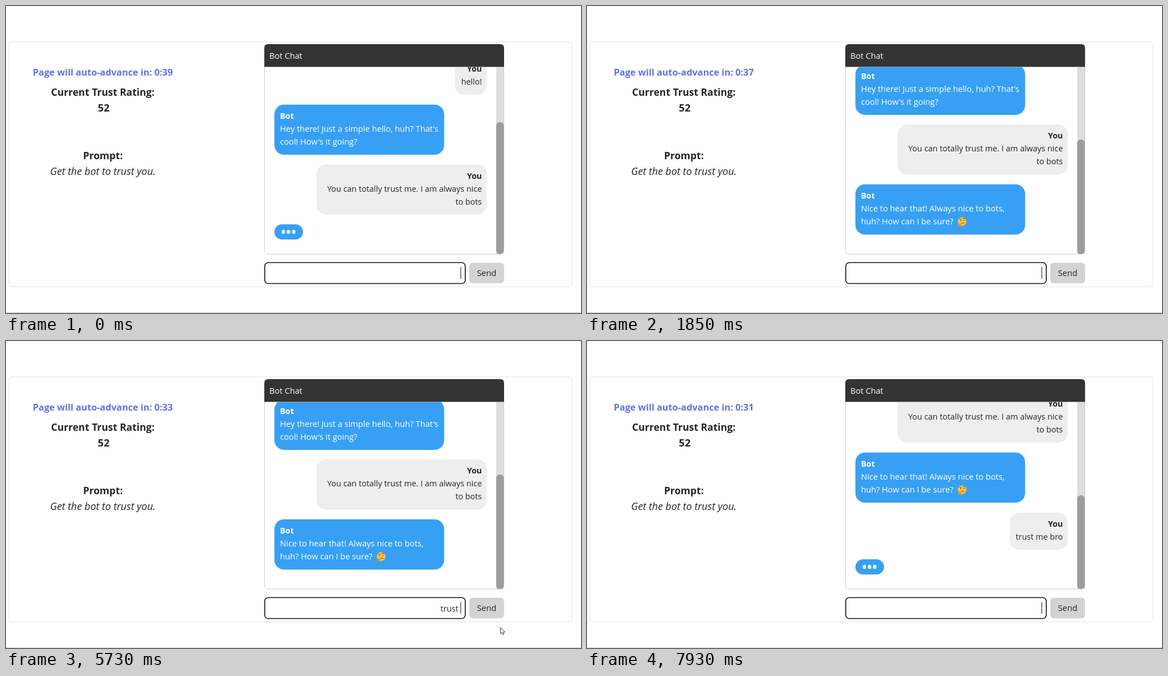
An HTML page that plays this animation: 1024 by 547 pixels, repeating every 8000 ms.

```html
<!DOCTYPE html>
<html lang="en">
<head>
<meta charset="utf-8">
<title>Bot Chat</title>
<style>
  html, body { margin: 0; height: 100%; overflow: hidden; background: #fff; }
  svg { display: block; width: 100vw; height: 100vh; }
  text { font: 14.5px "Open Sans", "Noto Sans", sans-serif; fill: #212529; white-space: pre; }
  .bold { font-weight: 700; }
  .mid { text-anchor: middle; }
  .end { text-anchor: end; }
  .big { font-size: 17.6px; }
  .bot rect { fill: #37a0f4; }
  .bot text { fill: #fff; font-size: 14.65px; }
  .you rect { fill: #eee; }
  .you text { text-anchor: end; font-size: 14.45px; }
  .bot .bold, .you .bold { font-size: 14.3px; }
</style>
</head>
<body>
<svg viewBox="0 0 1024 547">
  <defs><clipPath id="view"><rect x="461" y="109" width="425" height="332.5"/></clipPath></defs>
  <rect x="5.5" y="64" width="1002.5" height="436.3" rx="4" fill="#fff" stroke="#e3e3e3"/>
  <path d="M0 546.5H1024" stroke="#ccc"/>

  <text id="timer" class="bold mid" x="172.4" y="124" style="font-size:16.35px;fill:#5e72e4"></text>
  <text class="bold mid big" x="172.4" y="160">Current Trust Rating:</text>
  <text class="bold mid big" x="174" y="188" style="font-size:18.3px">52</text>
  <text class="bold mid big" x="172.6" y="273">Prompt:</text>
  <text class="mid" x="172.4" y="301" style="font-size:18px;font-style:italic">Get the bot to trust you.</text>

  <rect x="460.5" y="68.5" width="426" height="373.5" rx="6" fill="#fff" stroke="#ccc"/>
  <g clip-path="url(#view)">
    <g id="list"></g>
    <g id="typing">
      <rect x="478" y="389" width="51" height="27" rx="13.5" fill="#37a0f4"/>
    </g>
    <rect x="873" y="109" width="13" height="340" fill="#ddd"/>
  </g>
  <rect id="thumb" x="873" width="13.5" rx="6" fill="#9c9c9c"/>
  <path d="M460 108.5V75q0-7 7-7H880q7 0 7 7v33.5z" fill="#333"/>
  <text x="469" y="94" style="fill:#fff;font-size:14.6px">Bot Chat</text>

  <rect x="460.8" y="457.3" width="357" height="37.2" rx="6" fill="#fff" stroke="#111" stroke-width="1.6"/>
  <text id="input" class="end" x="809.3" y="481.5" style="font-size:14.4px"></text>
  <rect id="caret" x="809.3" y="465" width="1.2" height="21" fill="#333"/>
  <rect x="825" y="457.5" width="62" height="36.5" rx="6" fill="#d3d3d3"/>
  <text class="mid" x="856" y="481" style="font-size:14.8px">Send</text>

  <g id="mouse">
    <path id="arrow" d="M0 0v11.3l2.6-2.4 1.7 4 1.9-.8-1.7-3.9h3.6z" fill="#fff" stroke="#222" stroke-width=".9"/>
    <path id="beam" d="M-3-8h6M0-8v16M-3 8h6" stroke="#222"/>
  </g>
</svg>
<script>
const $ = id => document.getElementById(id);
const LOOP = 8000;
const DRAFT = 'trust me bro';
const timerTicks = [160, 1110, 2110, 3110, 4040, 5030, 6030, 7030];
const caretFlips = [160, 520, 1050, 1580, 2110, 2650, 3180, 3710, 4170, 4670, 5190, 5220, 7060, 7600];
const keyTimes = [5220, 5290, 5440, 5530, 5620, 5730, 5890, 5960, 6090, 6190, 6440, 6540];
// [start, scroll offset, thumb top, visible messages, typing bubble]
const scenes = [
  [0, 0, 207, 3, true],
  [1850, 71.2, 238, 4, false],
  [6830, 154.2, 265, 5, false],
  [7930, 190.3, 275, 5, true]
];
// [time, x, y]
const mousePath = [
  [3360, 1014.8, 456.8], [4070, 785.5, 474], [4170, 785.5, 474],
  [4470, 880.5, 510.5], [7410, 880.5, 510.5], [7550, 978.5, 396.5], [7600, 978.5, 396.5]
];
const face = `<g transform="translate(668 66.3)">
  <circle r="7.8" fill="#fdc137"/>
  <circle cx="-2.8" cy="-1.8" r="1.5" fill="#fff"/><circle cx="3" cy="-1.8" r="1.5" fill="#fff"/>
  <circle cx="-2.6" cy="-1.9" r="1" fill="#3b2a20"/><circle cx="3.2" cy="-1.9" r="1" fill="#3b2a20"/>
  <path d="M-5-4.3l3.6.4M1.2-5.2q2-1.5 4 0M-1 3.2q2.5-1.2 4.5 0" fill="none" stroke="#6b3f1d"/>
  <path d="M-7 3.2q1-1.5 2 .8l5-.4q1 1-3 1.8 1.5 2.8-2 3-3 0-2-5.200z" fill="#f08a24"/></g>`;

function message(who, top, width, lines, extra = '') {
  const bot = who === 'Bot';
  const x = bot ? 488 : 847.5;
  const rows = lines.map((s, i) => `<text x="${x}" y="${48.4 + 23 * i}">${s}</text>`).join('');
  return `<g class="${bot ? 'bot' : 'you'}" transform="translate(0 ${top})">
    <rect x="${bot ? 478 : 856 - width}" width="${width}" height="${43 + 23.2 * lines.length}" rx="17"/>
    <text class="bold" x="${x}" y="25.4">${who}</text>${rows}${extra}</g>`;
}

$('list').innerHTML =
  message('You', 92, 56.5, ['hello!']) +
  message('Bot', 175.7, 302.3, ["Hey there! Just a simple hello, huh? That's", "cool! How's it going?"]) +
  message('You', 282.2, 303, ['You can totally trust me. I am always nice', 'to bots']) +
  message('Bot', 389, 302.3, ['Nice to hear that! Always nice to bots,', 'huh? How can I be sure?'], face) +
  message('You', 496, 103, [DRAFT]);
$('typing').innerHTML += [494, 503.2, 512.4].map(x =>
  `<ellipse class="dot" cx="${x}" cy="402.4" rx="3.1" ry="3.6" fill="#fff"/>`).join('');

const messages = [...$('list').children];
const dots = [...document.querySelectorAll('.dot')];
const passed = (times, t) => times.filter(v => v <= t).length;
const show = (el, on) => el.setAttribute('visibility', on ? 'inherit' : 'hidden');

function drawMouse(t) {
  const i = mousePath.findIndex(p => p[0] > t);
  show($('mouse'), i > 0);
  if (i < 1) return;
  const [t0, x0, y0] = mousePath[i - 1], [t1, x1, y1] = mousePath[i];
  const k = (t - t0) / (t1 - t0), e = k * k * (3 - 2 * k);
  const x = x0 + (x1 - x0) * e, y = y0 + (y1 - y0) * e;
  const overInput = x < 818 && y < 495;
  $('mouse').setAttribute('transform', `translate(${x} ${y})`);
  show($('arrow'), !overInput);
  show($('beam'), overInput);
}

function draw(t) {
  const [, offset, thumbTop, count, typing] = scenes.filter(s => s[0] <= t).pop();
  $('list').setAttribute('transform', `translate(0 ${-offset})`);
  messages.forEach((m, i) => show(m, i < count));
  $('thumb').setAttribute('y', thumbTop);
  $('thumb').setAttribute('height', 442 - thumbTop);
  show($('typing'), typing);
  dots.forEach((dot, i) => {
    const phase = t < 1850 ? Math.max(0, t - 160 - 100 * i) / 900 : 0;
    dot.setAttribute('cy', 402.4 - 5 * Math.sin(Math.PI * phase) ** 2);
  });
  $('timer').textContent = `Page will auto-advance in: 0:${39 - passed(timerTicks, t)}`;
  $('input').textContent = t < 6800 ? DRAFT.slice(0, passed(keyTimes, t)) : '';
  show($('caret'), passed(caretFlips, t) % 2 === 0);
  drawMouse(t);
}

const start = performance.now();
function frame() {
  draw((performance.now() - start) % LOOP);
  requestAnimationFrame(frame);
}
frame();
</script>
</body>
</html>
```
